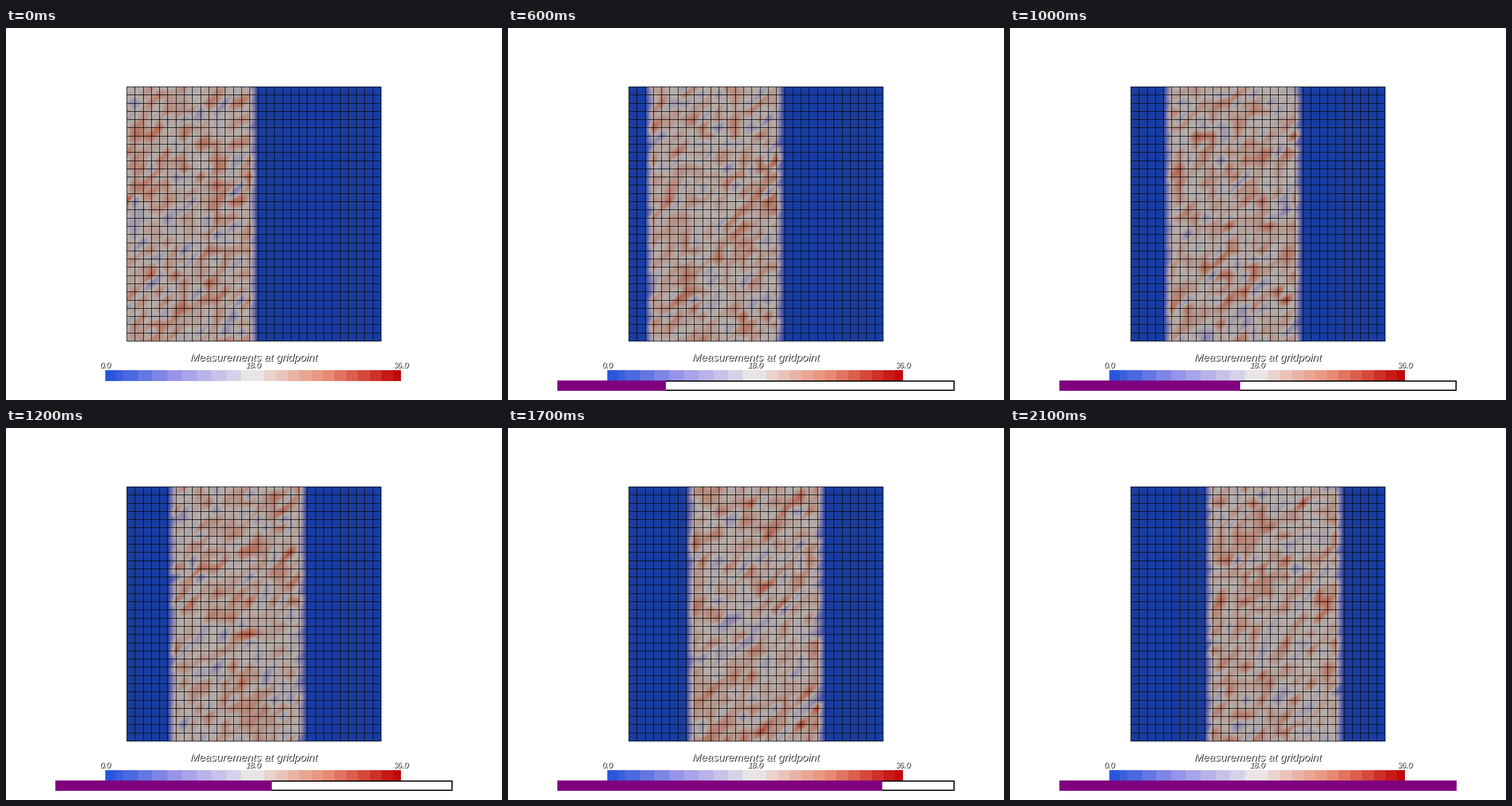
These frames come from a looping animation (864x648 px, 2200 ms). A matplotlib script:

```python
import numpy as np
import matplotlib.pyplot as plt
from matplotlib.animation import FuncAnimation
from matplotlib.collections import LineCollection
from matplotlib.colors import LinearSegmentedColormap
from matplotlib.patches import Rectangle

W, H, DPI = 864, 648, 100
FRAMES, STEPS = 22, 11
CELLS, BAND = 31, 16
X0, Y0, SIZE = 210, 102, 443
VMAX = 36.0
LIGHT = np.array([0.78, 0.76, 0.74])

SCALE_L, SCALE_R, SCALE_T, SCALE_B = 173, 688, 596, 615
BAR_L, BAR_R, BAR_T, BAR_B = 86, 778, 614, 632

cmap = LinearSegmentedColormap.from_list(
    "warmth", ["#2151db", "#9f99e9", "#eae6e7", "#e98d74", "#c00206"])


def readings(step):
    """Noisy measurements inside the moving band, zero elsewhere."""
    rng = np.random.default_rng(40 + step)
    grid = np.zeros((CELLS + 1, CELLS + 1))
    noise = rng.normal(19.8, 3.8, (CELLS + 1, BAND))
    grid[:, step:step + BAND] = np.clip(noise, 9, VMAX)
    return grid


def shade_mesh(grid):
    """Interpolate over triangles split along the rising diagonal."""
    pos = (np.arange(SIZE) + 0.5) * CELLS / SIZE
    cell = pos.astype(int)
    frac = pos - cell
    r, c = cell[:, None], cell[None, :]
    u, v = frac[None, :], 1 - frac[:, None]
    top_l, top_r = grid[r, c], grid[r, c + 1]
    bot_l, bot_r = grid[r + 1, c], grid[r + 1, c + 1]
    lower = bot_l + u * (bot_r - bot_l) + v * (top_r - bot_r)
    upper = bot_l + v * (top_l - bot_l) + u * (top_r - top_l)
    return cmap(np.where(u > v, lower, upper) / VMAX)[..., :3] * LIGHT


fig = plt.figure(figsize=(W / DPI, H / DPI), dpi=DPI, facecolor="white")
ax = fig.add_axes([0, 0, 1, 1])


def box(x0, y0, x1, y1, color, z):
    patch = Rectangle((x0, y0), x1 - x0, y1 - y0, fc=color, lw=0, zorder=z)
    return ax.add_patch(patch)


def label(x, y, text, px):
    """White lettering with a one-pixel black shadow."""
    for shift, color, z in ((1, "black", 6), (0, "white", 7)):
        ax.text(x + shift, y + shift, text, color=color, zorder=z,
                ha="center", va="baseline", family="Liberation Sans",
                style="italic", size=px * 72 / DPI)


meshes = [shade_mesh(readings(s)) for s in range(STEPS)]
image = ax.imshow(meshes[0], extent=(X0, X0 + SIZE, Y0 + SIZE, Y0),
                  interpolation="nearest", aspect="auto", zorder=1)
ax.set_xlim(0, W)
ax.set_ylim(H, 0)
ax.axis("off")

ticks = np.linspace(0, SIZE, CELLS + 1)
lines = [[(X0 + t, Y0), (X0 + t, Y0 + SIZE)] for t in ticks]
lines += [[(X0, Y0 + t), (X0 + SIZE, Y0 + t)] for t in ticks]
ax.add_collection(LineCollection(lines, colors="#080a0c",
                                 linewidths=72 / DPI, zorder=2))

# Colour scale: wider bands on the cool side than on the warm side
edges = np.r_[SCALE_L, 191, np.arange(204, 420, 25.6),
              np.arange(450, SCALE_R, 20.4), SCALE_R]
for a, b in zip(edges, edges[1:]):
    level = ((a + b) / 2 - SCALE_L) / (SCALE_R - SCALE_L)
    box(a, SCALE_T, b, SCALE_B, cmap(level), 3)

label(432, 580, "Measurements at gridpoint", 18.8)
for x, text in ((173.5, "0.0"), (431, "18.0"), (688, "36.0")):
    label(x, 592, text, 13.9)

border = box(BAR_L, BAR_T, BAR_R, BAR_B, "black", 8)
inner = box(BAR_L + 2, BAR_T + 2, BAR_R - 2, BAR_B - 2, "white", 9)
fill = box(BAR_L, BAR_T, BAR_L, BAR_B, "purple", 10)


def draw(i):
    # The mesh changes on even ticks, the progress bar on odd ones
    image.set_data(meshes[i // 2])
    done = (i + 1) // 2
    fill.set_width((BAR_R - BAR_L) * done / STEPS)
    for part in (border, inner, fill):
        part.set_visible(done > 0)
    return image, border, inner, fill


anim = FuncAnimation(fig, draw, frames=FRAMES, interval=100,
                     repeat=True, repeat_delay=0, blit=False)
plt.show()
```
